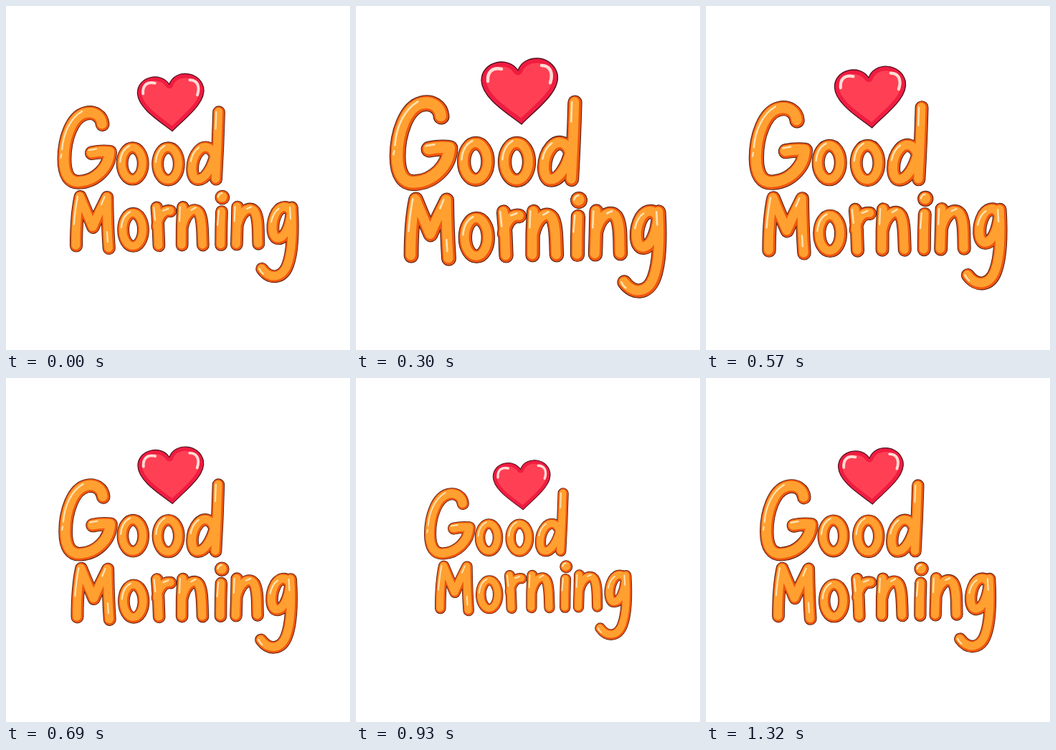
Recreate the animation shown at these times as an HTML page with a canvas. Size 480 by 480 pixels, loop 1.35 s.

```html
<!DOCTYPE html>
<html>
<head>
<meta charset="utf-8">
<title>Good Morning</title>
<style>
  html, body { margin: 0; height: 100%; overflow: hidden; background: #fff; }
  canvas { display: block; }
</style>
</head>
<body>
<canvas id="stage" width="480" height="480"></canvas>
<script>
const ctx = document.getElementById('stage').getContext('2d');
const LOOP = 1350, STEP = 30, CENTER = 240;
const DRAWN_AT = 1.148; // pulse scale at which the shapes below are laid out

const oval = (cx, cy, rx, ry) =>
  `M${cx - rx} ${cy}a${rx} ${ry} 0 1 1 ${2 * rx} 0a${rx} ${ry} 0 1 1 ${-2 * rx} 0Z`;

// Each letter: stroke weight, centre line, highlight
const letters = [
  [22, 'M119 154C118 141 106 133 92 136.5C70 142 58 178 58 210C58 236 67 248 83 246.5C108 245 130 224 131 198.5Q116 197 102 200',
    'M55 195C57 169 68 145 87 134M53 208L54 203M98 196L110 194'],
  [18.5, oval(167.3, 217, 16.7, 25.5), 'M148 215C149 202 155 193 163 189'],
  [18.5, oval(224.5, 217.5, 17, 26), 'M205 215C206 202 212 193 219 189'],
  [19.5, 'M305.5 134.5Q304 190 301 242M299 204C294 190 282 187 273 197C260 212 260 242 272 242.5C284 243 295 224 300 204',
    'M302 135L301 162M261 214C263 204 268 196 274 192'],
  [20, 'M77 348.5Q77 300 83.5 270Q95 298 104 319Q114 295 126.5 271Q127 315 129.5 352.5',
    'M80 270Q76 290 74 315M123 271L118 283M127 327L128 343'],
  [18.5, oval(168.3, 323, 16, 26.5), 'M150 320C151 308 156 299 164 295'],
  [19.5, 'M206 287.5Q209 318 209.5 348.5M207 318C208 303 217 291 228 293', 'M202 288L204 308M217 293L225 290'],
  [19.5, 'M248 287Q246 318 246.5 347.5M247 318C252 296 266 285 274 296C280 306 279 328 280 347.5',
    'M244 287L243 310M262 292L269 288'],
  [19.5, 'M310 294Q309 320 309 347', 'M306 293L304 316'],
  [23, 'M311 271L311.1 271', 'M305 271Q306 266 311 265'],
  [19.5, 'M335.5 286.5Q335 318 334 346.5M335 316C340 295 354 283 363 294C370 305 368 326 369 345.5',
    'M332 287L331 310M351 290L358 287'],
  [19.5, 'M422.5 287.5C425 330 423 360 416 379C408 401 388 404 374.5 385.5M422 296C417 284 406 284 398.5 295C389 312 390 337 401 337C412 336 420 318 422 296',
    'M420 288L421 306M390 311C392 301 396 294 402 290M371 386Q373 391 377 394']
].map(([weight, line, shine]) => ({ weight, line: new Path2D(line), shine: new Path2D(shine) }));

const heart = new Path2D('M231 165C212 150 176 129 175 104C175 77 213 69 226 90C234 66 274 67 281 95C286 120 250 145 231 165Z');
const heartShine = new Path2D('M184 105C183 92 190 85 203 88M259 83C270 83 276 92 271 107');

function stroke(path, color, width) {
  ctx.strokeStyle = color;
  ctx.lineWidth = width;
  ctx.stroke(path);
}

function drawLetter({ weight, line, shine }) {
  stroke(line, '#4a1a10', weight + 0.8);
  stroke(line, '#f0560f', weight - 1.2);
  ctx.save();
  ctx.translate(-0.7, -0.7);
  stroke(line, '#ffa030', weight - 6.5);
  stroke(shine, '#ffe2b4', 2.6);
  ctx.restore();
}

function drawHeart() {
  ctx.fillStyle = '#ff4054';
  ctx.fill(heart);
  ctx.save();
  ctx.clip(heart);
  stroke(heart, '#f01c40', 13);
  ctx.restore();
  stroke(heart, '#4f1220', 1.4);
  stroke(heartShine, '#ffdcd6', 4.5);
}

function draw(now) {
  const time = Math.floor(now % LOOP / STEP) * STEP;
  const scale = (1 + 0.15 * Math.sin(2 * Math.PI * time / LOOP)) / DRAWN_AT;
  const shift = CENTER * (1 - scale);
  ctx.setTransform(1, 0, 0, 1, 0, 0);
  ctx.fillStyle = '#fff';
  ctx.fillRect(0, 0, 480, 480);
  ctx.setTransform(scale, 0, 0, scale, shift, shift);
  ctx.lineCap = ctx.lineJoin = 'round';
  letters.forEach(drawLetter);
  drawHeart();
}

const start = performance.now();
function tick() {
  draw(performance.now() - start);
  requestAnimationFrame(tick);
}
tick();
</script>
</body>
</html>
```
